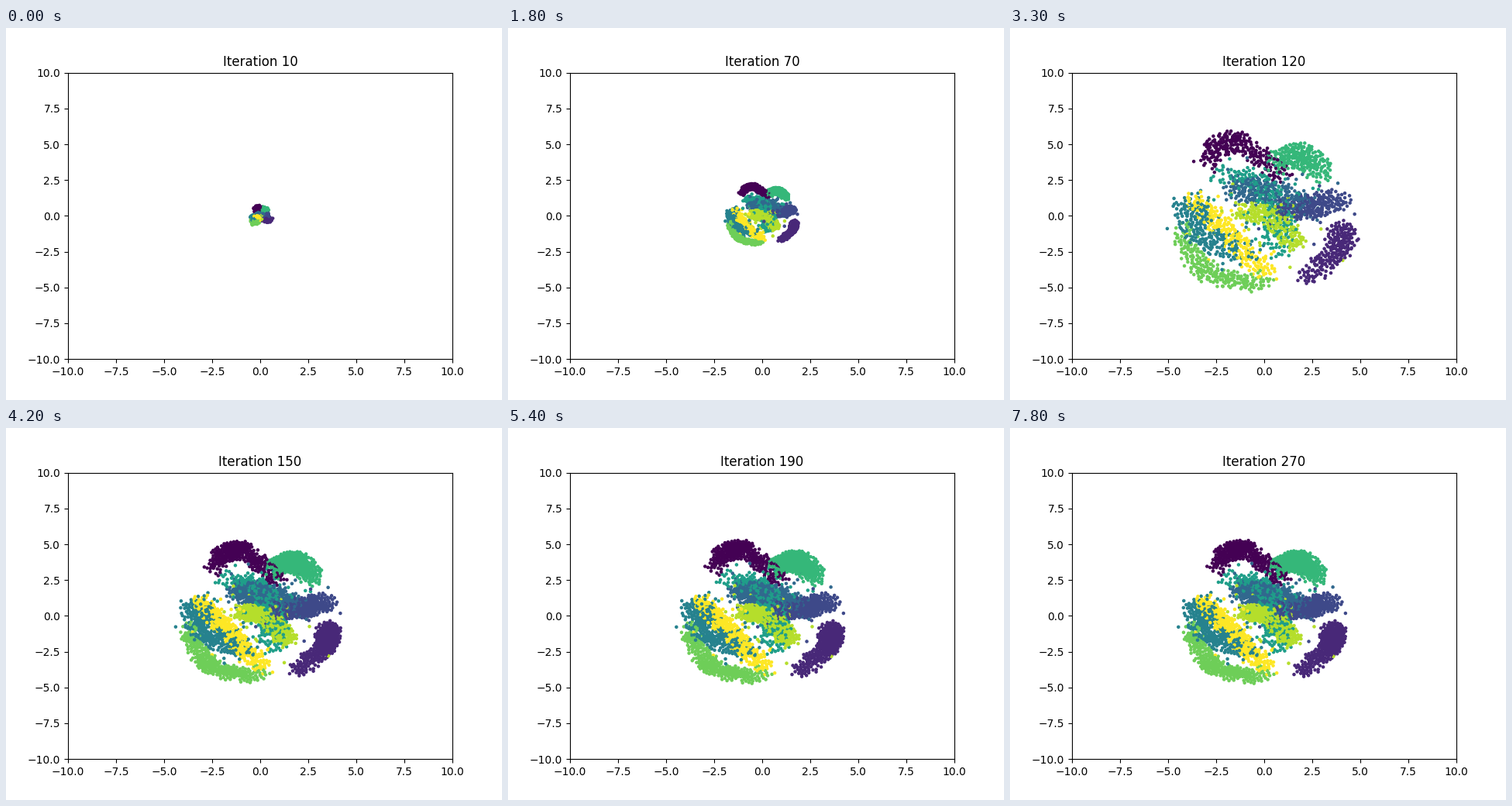
A matplotlib script that plays this animation: 640x480 px, repeating every 8 s.

```python
import numpy as np
import matplotlib.pyplot as plt
from matplotlib.animation import FuncAnimation

PER_CLASS = 250
RIM = (0, 1, 6, 7)
rng = np.random.default_rng(4)

# Each class is a band along a curve: start, bend, end, half width
BANDS = [
    ((-2.4, 3.3), (-1.7, 6.4), (0.9, 2.5), 0.60),
    ((3.6, -0.8), (3.9, -1.9), (2.0, -3.9), 0.60),
    ((0.9, 0.4), (2.2, 0.3), (3.5, 1.1), 0.65),
    ((-1.3, 1.6), (0.3, 1.9), (1.9, 0.6), 0.80),
    ((-3.4, 0.9), (-3.6, -1.6), (-0.8, -2.2), 0.85),
    ((-1.8, 2.5), (1.5, 2.6), (0.5, -2.4), 0.70),
    ((0.7, 3.3), (2.2, 4.6), (2.7, 2.5), 0.70),
    ((-3.7, -0.9), (-3.2, -4.9), (0.3, -4.0), 0.55),
    ((-1.0, 0.2), (0.6, 0.6), (1.4, -2.0), 0.60),
    ((-3.2, 1.2), (-1.7, -1.3), (0.3, -3.7), 0.55),
]


def band(start, bend, end, width):
    t = rng.random((PER_CLASS, 1))
    curve = (1 - t) ** 2 * np.array(start) + 2 * t * (1 - t) * np.array(bend) + t**2 * np.array(end)
    angle = rng.uniform(0, 2 * np.pi, PER_CLASS)
    reach = width * np.sqrt(rng.random(PER_CLASS))
    return curve + np.column_stack((reach * np.cos(angle), reach * np.sin(angle)))


def spread_out(points, gap=0.17, steps=8):
    """Push close neighbours apart so the dots lie evenly."""
    for _ in range(steps):
        dx, dy = (np.subtract.outer(axis, axis) for axis in points.T)
        distance = np.hypot(dx, dy) + 1e-6
        push = 0.25 * np.maximum(gap - distance, 0) / distance
        points = points + np.column_stack(((push * dx).sum(1), (push * dy).sum(1)))
    return points


labels = rng.permutation(np.repeat(np.arange(len(BANDS)), PER_CLASS))
settled = np.empty((len(labels), 2))
for label, shape in enumerate(BANDS):
    settled[labels == label] = band(*shape)

stray = (rng.random(len(labels)) < 0.12) & ~np.isin(labels, RIM)
settled[stray] += rng.normal(0, 0.8, (stray.sum(), 2))
settled = spread_out(settled)

means = np.array([settled[labels == k].mean(0) for k in range(len(BANDS))])[labels]
clump = 0.12 * means + rng.normal(0, 0.08, settled.shape)

# Compact stage: classes drawn together, denser towards the rim
compact = means + 0.85 * (settled - means)
radius = np.linalg.norm(compact, axis=1, keepdims=True)
compact *= 0.45 * (np.maximum(radius, 0.3) / 4.7) ** -0.2

bulge = settled * (0.12, 0.11)
bulge[:, 0] -= 0.05 * np.maximum(settled[:, 1], 0)
loosen = rng.normal(0, 0.06, settled.shape)


def layout(n):
    grow = min(1, (1 - np.exp((10 - n) / 25)) / (1 - np.exp(-60 / 25)))
    release = np.interp(n, [70, 80, 100, 110, 120], [0, 0.08, 0.18, 0.75, 1])
    swell = np.interp(n, [100, 120, 130, 140, 150, 170], [0, 1, 0.75, 0.2, -0.12, 0])
    early = clump + grow * (compact - clump)
    late = settled + swell * bulge + max(swell, 0) * loosen
    return early + release * (late - early)


fig, ax = plt.subplots(figsize=(6.4, 4.8), dpi=100)
dots = ax.scatter(*clump.T, s=5, c=labels, cmap="viridis")
ax.set_xlim(-10, 10)
ax.set_ylim(-10, 10)
title = ax.set_title("Iteration 10")


def update(frame):
    n = 10 * (frame // 3 + 1)
    dots.set_offsets(layout(n))
    title.set_text(f"Iteration {n}")
    return dots, title


anim = FuncAnimation(fig, update, frames=80, interval=100, repeat=True, repeat_delay=0)
plt.show()
```
